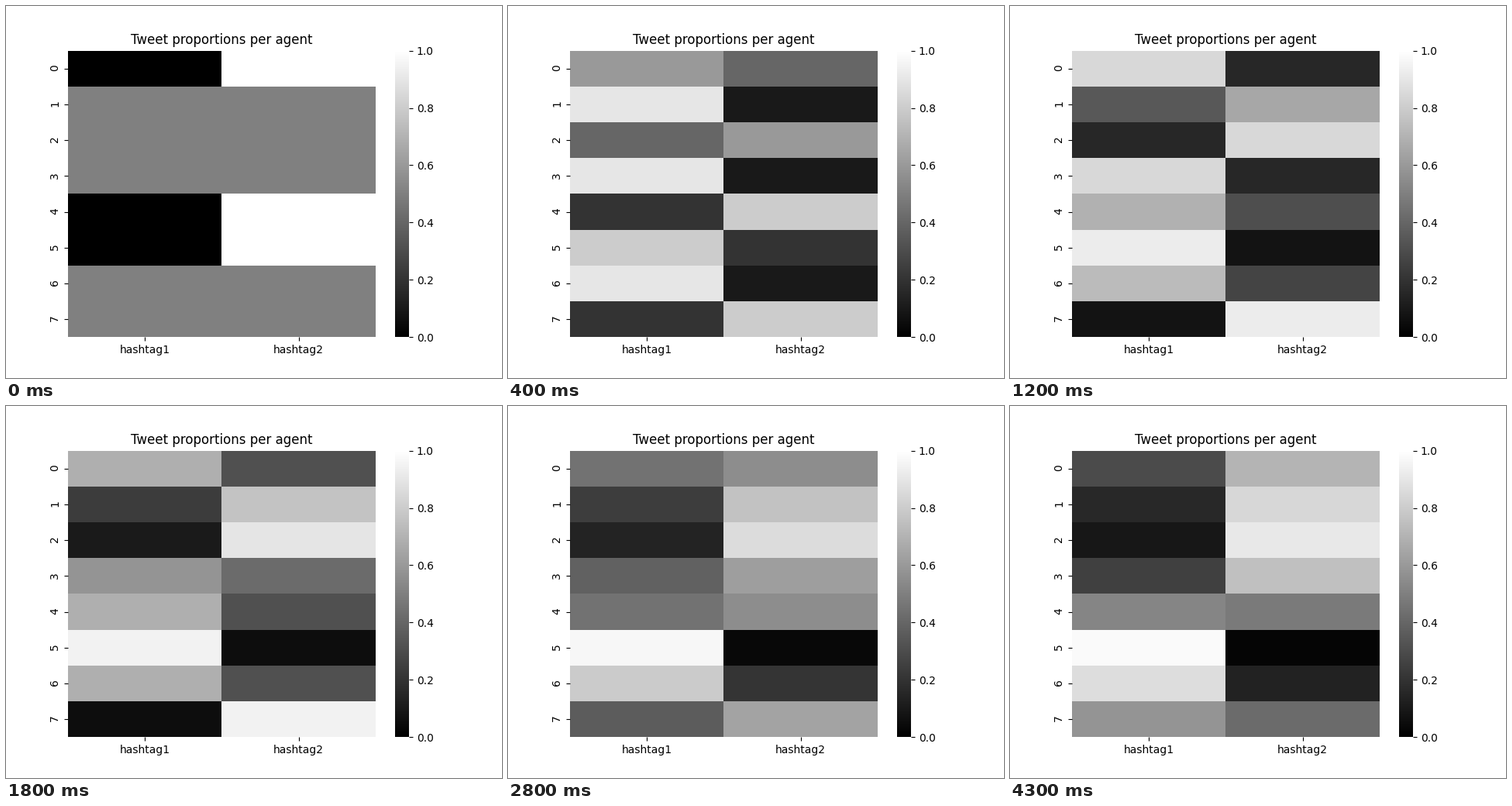
Recreate the animation shown at these times as a matplotlib script. Size 640 by 480 pixels, loop 4800 ms.

```python
import matplotlib.pyplot as plt
import numpy as np
from matplotlib.animation import FuncAnimation

STEPS = 48
STEP_MS = 100

# Every agent starts on hashtag2 and swaps hashtags at these times (in steps).
SWAPS = [
    [2, 15],
    [.5, 5, 22, 24.5],
    [.5, 2.5, 22, 24],
    [.5, 11.5],
    [4, 17, 34],
    [1],
    [.5, 10, 14, 16, 17.5],
    [.5, 1.5, 19.5],
]


def hashtag1_share(swaps, time):
    """Part of the time so far that an agent spent on hashtag1."""
    spent = sum((-1) ** i * max(time - swap, 0) for i, swap in enumerate(swaps))
    return spent / time


def proportions(step):
    first = np.array([hashtag1_share(swaps, step + 1) for swaps in SWAPS])
    return np.column_stack([first, 1 - first])


fig, ax = plt.subplots(figsize=(6.4, 4.8), dpi=100)
mesh = ax.pcolormesh(proportions(0), cmap="gray", vmin=0, vmax=1,
                     linewidths=0, edgecolor="white")
ax.set(xlim=(0, 2), ylim=(len(SWAPS), 0))
ax.spines[:].set_visible(False)
ax.set_xticks([0.5, 1.5], ["hashtag1", "hashtag2"])
ax.set_yticks(np.arange(len(SWAPS)) + 0.5, range(len(SWAPS)),
              rotation="vertical")
ax.set_title("Tweet proportions per agent")

bar = fig.colorbar(mesh, ax=ax)
bar.outline.set_linewidth(0)


def update(step):
    mesh.set_array(proportions(step))
    return [mesh]


anim = FuncAnimation(fig, update, frames=STEPS, interval=STEP_MS,
                     repeat=True, repeat_delay=0)
plt.show()
```
